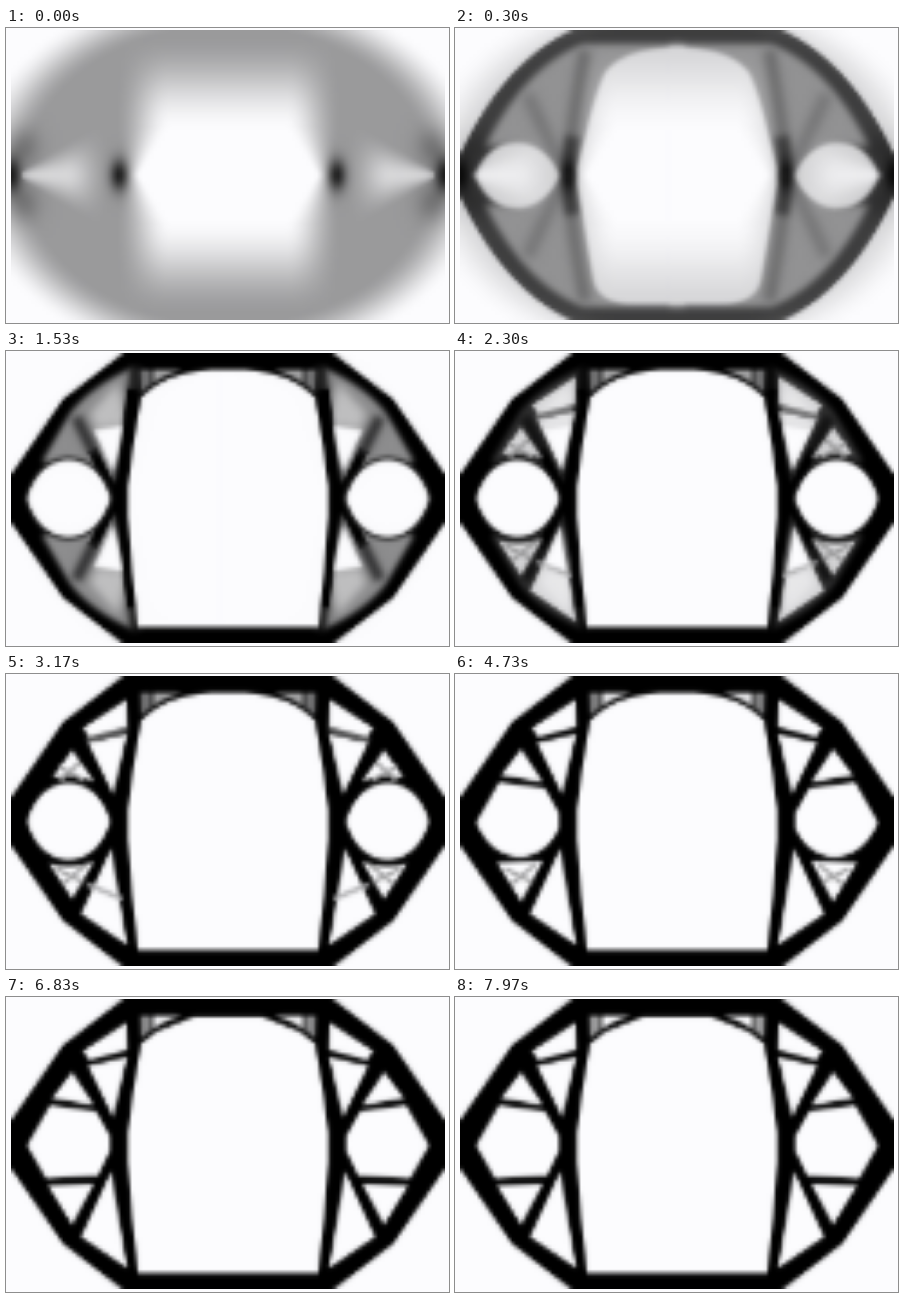
An HTML page with a canvas for the animation above (8 s loop, 443 px wide and 295 px high).

```html
<!DOCTYPE html>
<html lang="en">
<head>
<meta charset="utf-8">
<title>Truss forming</title>
<style>
html, body { margin: 0; width: 100%; height: 100%; overflow: hidden; background: #fcfcfe; }
canvas { display: block; }
</style>
</head>
<body>
<canvas id="stage" width="443" height="295"></canvas>
<script>
const LOOP = 8000, STEP = 1000 / 30;
const COLS = 120, ROWS = 80;
const AREA = { x: 5, y: 2, w: 434, h: 290 };
const WHITE = 1, BLACK = 0;

function makeContext(w, h) {
  const canvas = document.createElement('canvas');
  canvas.width = w;
  canvas.height = h;
  return canvas.getContext('2d');
}

const grey = v => `rgb(${[252, 252, 254].map(c => Math.round(c * v))})`;
const fill = (d, shade, { both = false, blur = 0 } = {}) => ({ d, shade, both, blur });
const line = (d, shade, width, options) => ({ ...fill(d, shade, options), width });
const both = { both: true };

const smooth = (from, to, v) => {
  const t = Math.min(1, Math.max(0, (v - from) / (to - from)));
  return t * t * (3 - 2 * t);
};
const bump = (dx, dy) => Math.exp(-dx * dx - dy * dy);

// Initial soft field; x and y are distances from the centre.
function softField(x, y) {
  const tip = Math.max(0, 1 - y / 48);
  const centre = smooth(114 - 10 * tip, 58 + 30 * tip, x) * smooth(142, 42, y);
  const corner = smooth(0.84, 1.1, Math.hypot(x / 237, y / 174.6));
  const reach = 207 - x;
  const wedge = reach > 0
    ? smooth(1, 0, y / (5 + 0.65 * reach)) * smooth(118, 162, x) : 0;
  const value = 0.61 + 0.39 * Math.max(centre, corner) + 0.24 * wedge
    - 0.48 * bump((x - 109) / 9, y / 16)
    - 0.55 * bump((217 - x) / 10, y / 18)
    - 0.16 * bump((x - 207) / 18, (y - 28) / 20);
  return Math.min(1, Math.max(0, value));
}

function softStage() {
  const ctx = makeContext(COLS, ROWS);
  for (let row = 0; row < ROWS; row++) {
    for (let col = 0; col < COLS; col++) {
      const x = Math.abs((col + 0.5) / COLS - 0.5) * AREA.w;
      const y = Math.abs((row + 0.5) / ROWS - 0.5) * AREA.h;
      ctx.fillStyle = grey(softField(x, y));
      ctx.fillRect(col, row, 1, 1);
    }
  }
  return ctx.canvas;
}

// Shapes describe the left half; "both" also repeats them below the axis.
function shapeStage(shapes) {
  const ctx = makeContext(444, 294);
  ctx.fillStyle = grey(WHITE);
  ctx.fillRect(0, 0, 444, 294);
  for (const s of shapes) {
    const path = new Path2D(s.d);
    ctx.filter = s.blur ? `blur(${s.blur}px)` : 'none';
    ctx.fillStyle = ctx.strokeStyle = grey(s.shade);
    ctx.lineWidth = s.width || 1;
    for (const sx of [1, -1]) {
      for (const sy of s.both ? [1, -1] : [1]) {
        ctx.setTransform(sx, 0, 0, sy, sx < 0 ? 444 : 0, sy < 0 ? 294 : 0);
        if (s.width) ctx.stroke(path);
        else ctx.fill(path);
      }
    }
  }
  const small = makeContext(COLS, ROWS);
  const k = COLS / AREA.w;
  small.imageSmoothingQuality = 'high';
  small.filter = 'blur(0.5px)';
  small.drawImage(ctx.canvas, -AREA.x * k, -AREA.y * k, 444 * k, 294 * k);
  return small.canvas;
}

const body = fill('M223 0H120L57 48 5 123 0 130V164L5 171 57 246 120 294H223Z', BLACK);
const roundBody = fill('M223 0H122Q50 30 5 126L0 134V160L5 168Q50 264 122 294H223Z', BLACK);
const hall = fill('M223 19H205Q158 22 135 47L127 95 122 135V165L126 220 132 275H223Z', WHITE);
const hallFinal = fill('M223 20H188L150 35 135 47 127 95 122 135V165L126 220 132 275H223Z', WHITE);
const corner = (inner, outer) => [
  fill('M134 19H145V33L135 41Z', inner),
  fill('M147 19H175Q158 24 147 32Z', outer)
];

const upperBay = [
  fill('M77 54L120 26 121 53 83 63Z', WHITE),
  fill('M82 69L121 60 107 120Z', WHITE)
];
const lowerBay = fill('M105 174L121 270 75 239Z', WHITE);
const upperEye = fill('M66 75L88 108 46 101Z', WHITE);
const lowerEye = fill('M42 188L88 186 66 227Z', WHITE);
const roundHole = fill('M21 147C35 96 90 96 104 147C90 198 35 198 21 147Z', WHITE);
const halfRoundHole = fill('M21 148L44 108 90 114 104 139V153C88 192 40 194 21 148Z', WHITE);
const hexHole = fill('M21 148L44 108 90 114 104 139V153L92 178 40 181Z', WHITE);
const faintCross = [
  line('M50 194L78 208', 0.65, 4),
  line('M56 210L80 190', 0.65, 4)
];

const forming = [
  roundBody,
  fill('M230 16H128Q70 38 30 118L60 116 106 146 124 146Q130 60 230 20Z', 0.56, { both: true, blur: 3 }),
  line('M106 138L72 66', 0.38, 13, { both: true, blur: 5 }),
  line('M113 147Q116 100 130 22', 0.3, 13, { both: true, blur: 4 }),
  line('M113 147Q114 125 118 108', BLACK, 14, { both: true, blur: 3 }),
  fill('M230 19C190 19 165 26 150 44Q140 62 122 140V155L138 250Q142 274 175 275H230Z', WHITE, { blur: 1.5 }),
  fill('M20 147C35 104 85 102 105 147C85 192 35 190 20 147Z', WHITE, { blur: 1.5 })
];

const braced = [
  body,
  fill('M126 17Q84 36 64 62L36 110 106 136 125 60Z', 0.56, { both: true, blur: 2.5 }),
  fill('M84 62L112 32 122 74 90 78Z', 0.76, { both: true, blur: 4 }),
  fill('M87 79L120 74 107 120Z', WHITE, { both: true, blur: 1 }),
  line('M130 16L126 44', 0.15, 11, { both: true, blur: 3 }),
  line('M114 147L126 38', BLACK, 11, both),
  line('M110 147L86 98', BLACK, 10, both),
  line('M88 102L70 66', 0.2, 11, { both: true, blur: 3 }),
  line(roundHole.d, 0.1, 7, { blur: 1 }),
  roundHole, hall, ...corner(0.45, 0.65)
];

const cleared = [
  body, ...upperBay, lowerBay,
  line('M80 66L122 55', 0.35, 5),
  line('M82 210L116 224', 0.72, 5),
  fill('M66 76L88 107Q65 99 46 104Z', WHITE),
  fill('M66 224L88 187Q65 195 43 189Z', WHITE),
  line('M52 92L78 106', 0.65, 4),
  line('M54 106L74 88', 0.65, 4),
  ...faintCross, roundHole, hall, ...corner(0.45, 0.65)
];

const straightened = [
  body, ...upperBay, lowerBay, upperEye, lowerEye, ...faintCross,
  halfRoundHole, hall, ...corner(0.5, 0.9)
];

const trimmed = [
  body, ...upperBay, lowerBay, upperEye, lowerEye,
  hexHole, hallFinal, ...corner(0.55, 0.95)
];

const settled = [
  body, ...upperBay, lowerBay, upperEye, lowerEye,
  hexHole, hallFinal, ...corner(0.62, WHITE)
];

const stages = [
  { at: 0, image: softStage() },
  { at: 730, image: shapeStage(forming) },
  { at: 1530, image: shapeStage(braced) },
  { at: 3170, image: shapeStage(cleared) },
  { at: 4730, image: shapeStage(straightened) },
  { at: 6830, image: shapeStage(trimmed) },
  { at: 7970, image: shapeStage(settled) }
];

const mix = makeContext(COLS, ROWS);
const screen = document.getElementById('stage').getContext('2d');

function render(time) {
  const found = stages.findIndex(s => s.at > time);
  const next = found < 0 ? stages.length - 1 : found;
  const from = stages[next - 1], to = stages[next];
  const u = Math.min(1, (time - from.at) / (to.at - from.at));

  mix.globalAlpha = 1;
  mix.drawImage(from.image, 0, 0);
  mix.globalAlpha = 1 - (1 - u) ** 1.7;
  mix.drawImage(to.image, 0, 0);

  screen.fillStyle = grey(WHITE);
  screen.fillRect(0, 0, 443, 295);
  screen.drawImage(mix.canvas, AREA.x, AREA.y, AREA.w, AREA.h);
}

function tick() {
  const time = performance.now() % LOOP;
  render(Math.floor(time / STEP) * STEP);
  requestAnimationFrame(tick);
}
tick();
</script>
</body>
</html>
```
